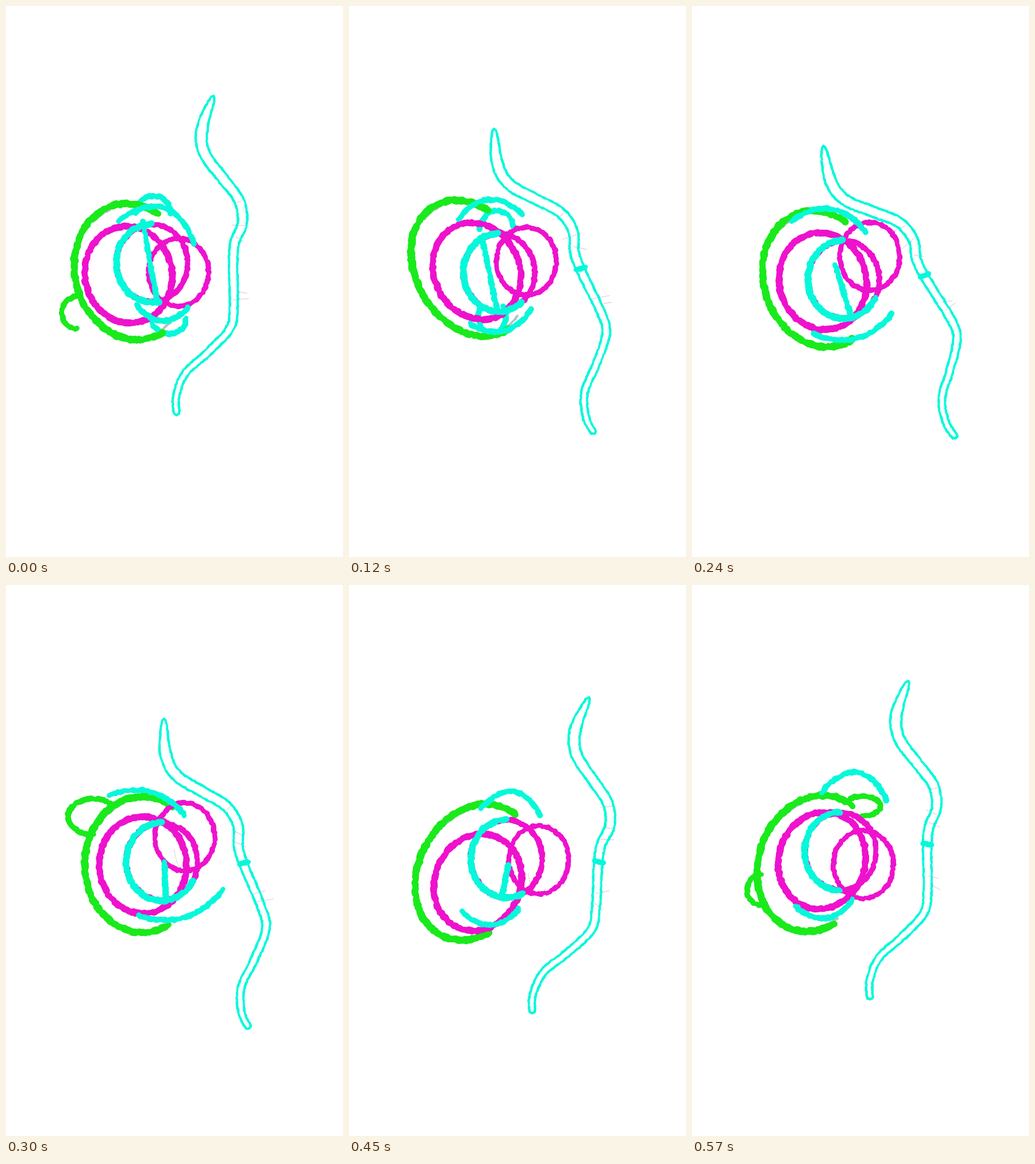
An HTML page with a canvas that plays this animation: 586x956 px, repeating every 0.6 s.

```html
<!DOCTYPE html>
<html>
<head>
<meta charset="utf-8">
<style>
html, body { margin: 0; height: 100%; overflow: hidden; background: #fff; }
canvas { display: block; }
</style>
</head>
<body>
<canvas id="stage" width="586" height="956"></canvas>
<script>
const ctx = document.getElementById('stage').getContext('2d');
const LOOP = 600, STEP = 30;
const GREEN = '#1aea1c', PINK = '#ee12cd', CYAN = '#06f8da', GREY = '#b4c2c4', FAINT = '#e9c9e4';

// bow: centre, tilt      shell: centre, lean     big, small: centre
// mid: centre, arc end   bar: shift of its top and bottom, height of its top
// top: two ends, rise    base: two ends          loops: colour, centre, radii, turn from, to
const poses = [
  { t: 0, bow: [329, 432.5, -.115], shell: [219, 461, -.08], big: [213, 466], mid: [254, 446, .53],
    small: [300, 462], bar: [-16, 9, -71], top: [195, 374, 326, 412, 45], base: [227, 517, 317, 522],
    loops: [[GREEN, 124, 532, 27, 28, 0, .5], [CYAN, 256, 360, 30, 31, -.25, .25], [CYAN, 283, 542, 30, 27, .25, .75]] },
  { t: 60, bow: [339, 466.5, .068], shell: [216, 451, -.2], big: [227, 453], mid: [264, 457, .55],
    small: [307, 451], bar: [-21, -18, -57], top: [205, 362, 310, 352, 27], base: [228, 540, 325, 515],
    loops: [[CYAN, 257, 388, 29, 33, -.25, .25], [CYAN, 249, 538, 24, 31, .15, .85]] },
  { t: 180, bow: [339, 484, .493], shell: [210, 463, -.18], big: [218, 470], mid: [258, 467, .66],
    small: [309, 437], bar: [-32, 14, -57], top: [175, 380, 298, 384, 36], base: [197, 558, 315, 535], loops: [] },
  { t: 300, bow: [348.5, 501, .269], shell: [237, 485, 0], big: [238, 486], mid: [271, 480, .67],
    small: [311, 437], bar: [4, 7, 0], top: [180, 366, 310, 400, 25], base: [230, 573, 377, 528],
    loops: [[GREEN, 152, 402, 44, 31, -.12, .5]] },
  { t: 390, bow: [351, 464, .011], shell: [234, 502, .12], big: [238, 506], mid: [276, 473, .6],
    small: [325, 459], bar: [-6, -5, -63], top: [208, 380, 327, 406, 20], base: [225, 550, 343, 527],
    loops: [[GREEN, 170, 418, 20, 22, 0, .3]] },
  { t: 450, bow: [368, 469, -.178], shell: [217, 498, .18], big: [224, 516], mid: [274, 475, .58],
    small: [330, 477], bar: [3, -8, 10], top: [230, 388, 332, 400, 36], base: [196, 565, 295, 561], loops: [] },
  { t: 570, bow: [343, 442.5, -.119], shell: [214, 483, .12], big: [226, 478], mid: [258, 462, .5],
    small: [298, 485], bar: [0, 0, 66], top: [226, 360, 338, 373, 42], base: [180, 557, 280, 545],
    loops: [[GREEN, 120, 529, 24, 27, 0, .5], [GREEN, 295, 384, 33, 17, .5, 1.1]] }
];
const bowSpine = [[361, 156], [341, 213], [345, 255], [376, 298], [405, 337], [411, 376], [398, 410],
  [395, 450], [396, 520], [389, 560], [349, 603], [312, 637], [296, 677], [297, 709]];

let seed = 1;
const rand = () => (seed = seed * 16807 % 2147483647) / 2147483647;
const plot = (n, at) => Array.from({ length: n + 1 }, (_, j) => at(j / n));

// smooth curve from b to c with slopes m0 and m1
const hermite = (b, c, m0, m1, f) =>
  b + (c - b) * f * f * (3 - 2 * f) + f * (1 - f) * ((1 - f) * m0 - f * m1);

// part of a leaning ellipse; turns run from the top to the left
function ring(x, y, rx, ry, lean = 0, from = 0, to = 1) {
  return plot(Math.ceil((to - from) * (rx + ry) * .9), u => {
    const a = (from + (to - from) * u) * 2 * Math.PI, dy = ry * Math.cos(a);
    return [x - rx * Math.sin(a) + lean * dy, y - dy];
  });
}

function arch(x0, y0, x1, y1, rise) {
  const dx = x1 - x0, dy = y1 - y0, len = Math.hypot(dx, dy);
  return plot(40, u => {
    const h = rise * Math.max(0, Math.sin(Math.PI * u)) ** .8 / len;
    return [x0 + dx * u + dy * h, y0 + dy * u - dx * h];
  });
}

function spine(u) {
  const last = bowSpine.length - 1, i = Math.min(last - 1, Math.floor(u * last));
  const at = k => bowSpine[Math.max(0, Math.min(last, k))];
  return [0, 1].map(c => {
    const [a, b, d, e] = [-1, 0, 1, 2].map(o => at(i + o)[c]);
    return hermite(b, d, (d - a) / 2, (e - b) / 2, u * last - i);
  });
}

// one side of the bow: the spine moved sideways, narrowing downwards and at the ends
function bowSide(side) {
  return plot(190, u => {
    const [x, y] = spine(u), [x0, y0] = spine(Math.max(0, u - .005)), [x1, y1] = spine(Math.min(1, u + .005));
    const taper = Math.min(1, Math.sqrt(13 * u), Math.sqrt(80 * (1 - u)));
    const h = side * (10 - 5 * u) * taper / Math.hypot(x1 - x0, y1 - y0);
    return [x + (y1 - y0) * h, y - (x1 - x0) * h];
  });
}
const bowLine = [...bowSide(-1), ...bowSide(1).reverse()];

// crayon line: short segments with a wavering place and width
function crayon(points, color, width) {
  const wobble = Math.min(2.2, width * .3);
  const rough = points.map(p => p.map(v => v + (rand() - .5) * wobble));
  ctx.strokeStyle = color;
  for (let i = 1; i < rough.length; i++) {
    ctx.lineWidth = width * (.8 + .4 * rand());
    ctx.beginPath();
    ctx.moveTo(...rough[i - 1]);
    ctx.lineTo(...rough[i]);
    ctx.stroke();
  }
}

function neighbour(i) {
  const n = poses.length, p = poses[(i + n) % n];
  return { ...p, t: p.t + LOOP * Math.floor(i / n) };
}

function poseAt(t) {
  const i = poses.findLastIndex(p => p.t <= t);
  const [a, b, c, d] = [-1, 0, 1, 2].map(o => neighbour(i + o));
  const h = c.t - b.t, f = (t - b.t) / h;
  const pose = { loops: (f > .5 ? c : b).loops };
  for (const key of ['bow', 'shell', 'big', 'mid', 'small', 'bar', 'top', 'base'])
    pose[key] = b[key].map((v, k) => hermite(v, c[key][k],
      (c[key][k] - a[key][k]) / (c.t - a.t) * h, (d[key][k] - v) / (d.t - b.t) * h, f));
  return pose;
}

function drawBow([x, y, tilt], grip) {
  const [x0, y0, tilt0] = poses[0].bow;
  ctx.save();
  ctx.translate(x, y);
  ctx.rotate(tilt0 - tilt);
  ctx.translate(-x0, -y0);
  for (const my of [345, 380, 400, 495, 510])
    crayon(arch(386 + rand() * 16, my, 408 + rand() * 16, my + rand() * 24 - 8, 0), FAINT, .8);
  crayon(bowLine, CYAN, 3.9);
  if (grip) crayon(arch(388, 438, 404, 441, 0), CYAN, 7);
  ctx.restore();
}

function draw(t) {
  const { bow, shell, big, mid, small, bar, top, base, loops } = poseAt(t);
  const [sx, sy, lean] = shell, [mx, my, arcEnd] = mid;
  seed = 977 + t * 31;
  ctx.fillStyle = '#fff';
  ctx.fillRect(0, 0, 586, 956);
  ctx.lineCap = 'round';

  // rubbed-out remains
  for (const side of [.05, .5]) {
    const from = side + rand() * .06;
    crayon(ring(sx, sy, 95, 113, lean, from, from + .06), GREY, 4);
  }
  crayon(ring(...small, 20, 60, 0, .3 + rand() * .1, .6), FAINT, 1);

  for (const [color, x, y, rx, ry, from, to] of loops) crayon(ring(x, y, rx, ry, 0, from, to), color, 9);
  crayon(ring(sx, sy, 100, 118, lean, -.09, .575), GREEN, 11.5);
  crayon(ring(...big, 76, 84, lean / 2), PINK, 10.5);
  crayon(ring(mx, my, 62, 67), PINK, 9);
  crayon(ring(...small, 52, 59), PINK, 8);
  crayon(arch(mx + bar[0], my + bar[2], mx + bar[1], my + 66, 0), CYAN, 9);
  crayon(ring(mx, my, 62, 68, 0, 0, arcEnd), CYAN, 10.5);
  crayon(arch(...top), CYAN, 9);
  crayon(arch(...base, -27), CYAN, 9);
  drawBow(bow, t > 0);
}

let shown = -1;
const start = performance.now();
function tick() {
  const t = Math.floor((performance.now() - start) % LOOP / STEP) * STEP;
  if (t !== shown) draw(shown = t);
  requestAnimationFrame(tick);
}
tick();
</script>
</body>
</html>
```
